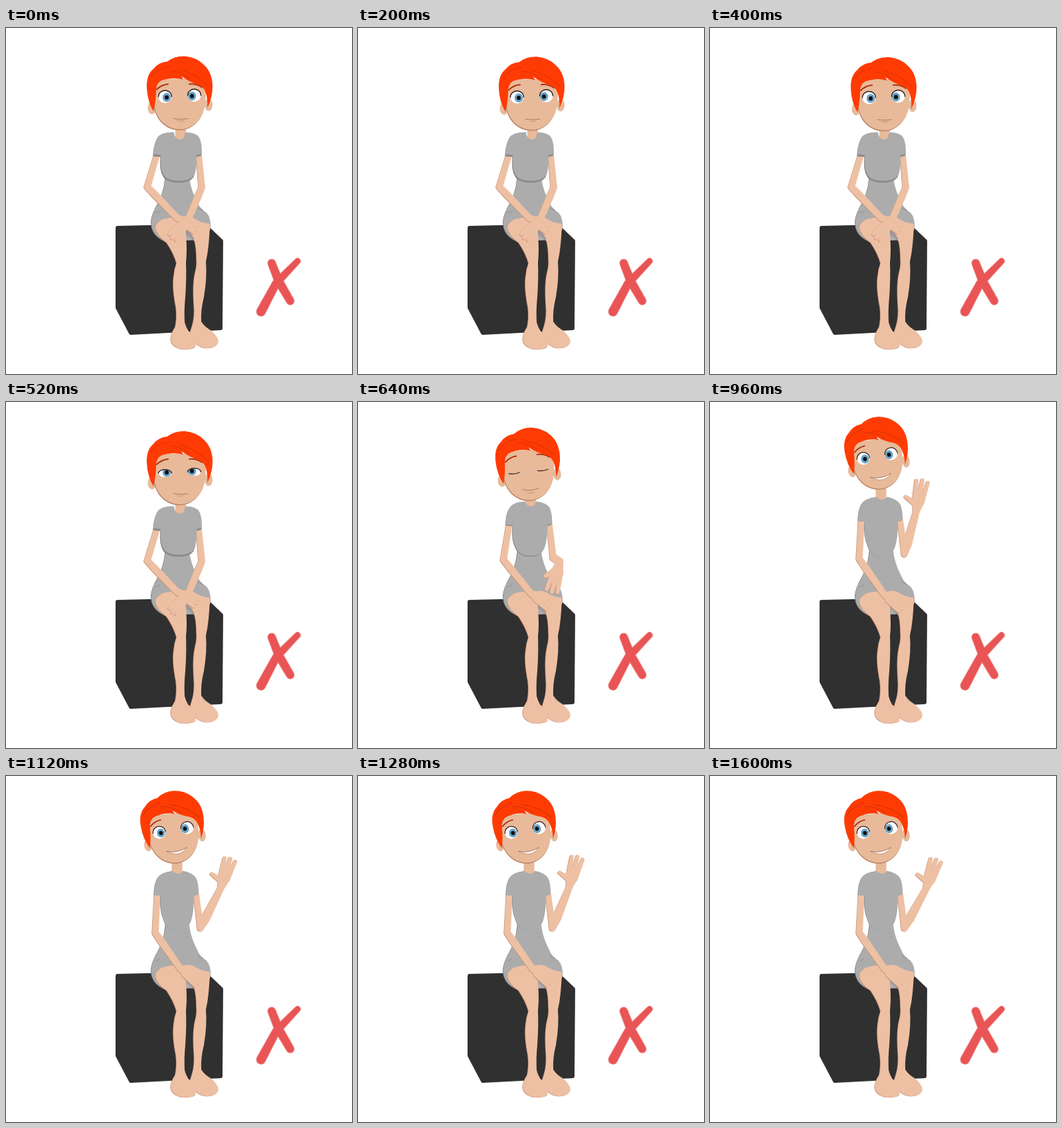
An HTML page with a canvas that plays this animation: 521x521 px, repeating every 1680 ms.

```html
<!DOCTYPE html>
<html lang="en">
<head>
<meta charset="utf-8">
<title>Waving from the box</title>
<style>
  html, body { margin: 0; height: 100%; overflow: hidden; background: #fff; }
  canvas { display: block; width: 100vw; height: 100vh; }
</style>
</head>
<body>
<canvas id="stage" width="521" height="521"></canvas>
<script>
const ctx = document.getElementById('stage').getContext('2d');
const SKIN = '#eec0a3', FACE = '#e8ba9a', SHADE = '#c2927a', GREY = '#acacac', DARK_GREY = '#8b8b8b';
const LOOP = 1680, STEP = 40, LAST = 1600;
const START = 520, BLINK = 640, WAVE = 427;

const clamp = v => Math.max(0, Math.min(1, v));
const mix = (a, b, k) => a + (b - a) * k;
const smooth = v => (v = clamp(v)) * v * (3 - 2 * v);
const easeOut = (v, power) => 1 - (1 - clamp(v)) ** power;
const rad = degrees => degrees * Math.PI / 180;

function fill(shape, color) {
  ctx.fillStyle = color;
  ctx.fill(typeof shape === 'string' ? new Path2D(shape) : shape);
}

function line(shape, color, width = 1) {
  ctx.strokeStyle = color;
  ctx.lineWidth = width;
  ctx.lineCap = ctx.lineJoin = 'round';
  ctx.stroke(typeof shape === 'string' ? new Path2D(shape) : shape);
}

function oval(x, y, rx, ry, color) {
  const path = new Path2D();
  path.ellipse(x, y, rx, ry, 0, 0, 7);
  fill(path, color);
}

function shaded(shape, color, shade = SHADE, dx = -.8, dy = .6) {
  ctx.save();
  ctx.translate(dx, dy);
  fill(shape, shade);
  ctx.restore();
  fill(shape, color);
}

// Tapered capsules through a chain of [x, y, radius]
function limb(path, ...joints) {
  for (let i = 1; i < joints.length; i++) {
    const [x, y, r] = joints[i - 1], [u, v, s] = joints[i];
    const a = Math.atan2(v - y, u - x), q = Math.PI / 2;
    path.moveTo(x + r * Math.cos(a + q), y + r * Math.sin(a + q));
    path.arc(x, y, r, a + q, a + 3 * q);
    path.arc(u, v, s, a - q, a + q);
    path.closePath();
  }
}

// The hand points along angle (clockwise from up); side puts the thumb left or right
function drawArm(shoulder, [ex, ey], [wx, wy], angle, size, side, bulge) {
  const path = new Path2D(), a = rad(angle);
  const px = wx + 16 * size * Math.sin(a), py = wy - 16 * size * Math.cos(a);
  limb(path, shoulder, [ex, ey, 5], [mix(ex, wx, .25), mix(ey, wy, .25), bulge], [wx, wy, 5], [px, py, 9 * size]);
  limb(path, [mix(px, wx, .3), mix(py, wy, .3), 5], [px + 19 * side * size, py - 8 * Math.cos(a), 2.8]);
  for (const i of [-1, 0, 1]) {
    const bx = px + 5.5 * i * size * Math.cos(a), by = py + 5.5 * i * size * Math.sin(a);
    const b = a + rad(6 * i), reach = (34 - 2 * Math.abs(i)) * size;
    limb(path, [bx, by, 4], [bx + reach * Math.sin(b), by - reach * Math.cos(b), 3]);
  }
  shaded(path, SKIN);
}

function drawCube() {
  const box = 'M168 301L300 298L324 321L323 452L188 459L168 421Z';
  fill(box, '#303030');
  line(box, '#303030', 6);
}

function drawCross() {
  const cross = new Path2D();
  limb(cross, [439, 351, 4], [407, 384, 5.5], [384, 427, 6.5]);
  limb(cross, [400, 354, 5.5], [411, 382, 6], [428, 411, 5.5]);
  line(cross, '#f08a8a', 2);
  fill(cross, '#e95455');
}

function drawSkirtAndLegs() {
  shaded('M241 212H276Q274 235 288 262Q292 272 302 278Q309 286 308 302Q304 314 284 319L240 321Q218 312 219 290Q220 279 231 260Q241 240 241 212Z',
    GREY, DARK_GREY, -1, .5);
  fill('M266 296L290 302L287 326Q280 315 268 309Z', '#999');
  line('M225 279L231 276M289 271L297 275', DARK_GREY);
  shaded('M262 287Q275 281 286 288Q292 293 307 295Q306 330 301 352Q303 375 298 405Q293 425 294 442Q298 449 308 455Q320 465 320 472Q318 482 302 482Q288 481 279 466Q276 460 280 450Q285 435 283 415Q281 385 285 368Q288 357 287 348Q287 328 283 317Q278 305 262 296Z', SKIN);
  shaded('M225 302Q224 294 236 288Q250 284 264 286Q271 295 271 312Q273 335 271 353Q272 375 270 405Q268 425 269 443Q272 455 281 464Q288 474 285 481Q276 485 262 483Q249 479 248 468Q249 459 255 450Q258 435 256 420Q250 390 253 372Q254 362 257 354Q253 339 242 323Q228 314 225 302Z', SKIN);
}

function drawShirt(rise) {
  const collar = 157 - 3 * rise, scoop = 168 - 10 * rise, side = 222 + 6 * rise, hem = 230 + 14 * rise;
  ctx.save();
  ctx.translate(258.5 - 2 * rise, -11 * rise);
  ctx.scale(1 - .08 * rise, 1);
  ctx.translate(-258.5, 0);
  shaded(`M253 ${collar}Q254 ${scoop} 262 ${scoop}Q269 ${scoop} 270 ${collar}Q286 157 291 165Q295 172 295 189Q291 191 287 191Q288 212 283 ${side}Q277 ${hem} 262 ${hem}Q244 ${hem} 238 ${side}Q231 212 233 191Q227 191 222 190Q223 172 228 165Q234 156 253 ${collar}Z`,
    GREY, DARK_GREY, -.8, 3 * (1 - rise));
  ctx.restore();
}

function drawEye(x, y, irisX, open) {
  const cy = y + 6 * (1 - open);
  if (open < .1) return line(`M${x - 8} ${cy + 1}Q${x + 1} ${cy + 3} ${x + 8} ${cy}`, '#3a2520', 1.3);
  const lid = new Path2D(), edge = new Path2D();
  lid.ellipse(x, cy, 10, 9.5 * open, 0, 0, 7);
  edge.ellipse(x, cy, 10, 9.5 * open, 0, Math.PI, 2 * Math.PI);
  fill(lid, '#fff');
  ctx.save();
  ctx.clip(lid);
  oval(irisX, y + 1, 6.3, 6.8, '#6aa3c9');
  oval(irisX, y + 1, 3, 3.2, '#111');
  ctx.restore();
  line(edge, '#2a1a17', 1.3);
}

function drawMouth(smile) {
  const half = 11 + 5 * smile, left = 263 - half, right = 263 + half;
  const y = 138 - 3 * smile, lip = y + 3 + 10 * smile;
  const upper = `M${left} ${y}Q263 ${y + 2 + 9 * Math.min(smile, .4)} ${right} ${y - 2 * smile}`;
  if (smile > .5) {
    fill(`${upper}Q267 ${lip} ${left} ${y}Z`, '#fff');
    line(`M${left} ${y}Q267 ${lip} ${right} ${y - 2 * smile}`, '#b57d62', .8);
  } else {
    line(`M258 ${lip}Q263 ${lip + 2} 268 ${lip}`, '#c08a6e', .8);
  }
  line(upper, '#a66f56', .9);
}

function drawHead(x, y, rise, open, smile) {
  const browLift = 9 * clamp(rise * 2 - 1);
  ctx.save();
  ctx.translate(x, y);
  ctx.rotate(rad(-7 * rise));
  ctx.scale(1 - .035 * rise, 1 - .02 * rise);
  ctx.translate(-262, -106);
  oval(220, 122, 6.5, 9.5, FACE);
  oval(305, 117, 6, 9.5, FACE);
  shaded('M224 78H299Q302 100 300 115C297 142 278 154 262 154C245 154 226 142 223 115Q222 95 224 78Z', FACE, '#b98467', -.8, 1.4);
  drawEye(239.5, 105, 242, open);
  drawEye(283.5, 103, 280, open);
  line('M227 94Q234 87 244 86', '#b2300c', 2);
  line(`M276 ${86 - browLift}Q287 ${85 - browLift} 295 ${91 - browLift}`, '#b2300c', 2);
  drawMouth(smile);
  fill('M222 127Q213 112 212 92Q211 72 222 63Q230 53 243 52Q254 43 270 44Q287 46 297 56Q311 68 311 90Q311 106 303 122Q304 108 301 100Q299 91 290 87Q276 83 264 74L267 79Q250 75 235 80Q226 84 226 96Q226 110 222 127Z', '#ff3b04');
  line('M247 66Q262 66 277 78M260 64Q286 70 305 90M218 76Q226 63 246 60', '#dc3303', 1.2);
  ctx.restore();
}

function draw(t) {
  const rise = easeOut((t - START) / 260, 1.2);
  const lift = smooth((t - START) / 360);
  const raise = easeOut((t - START) / 440, 1.6);
  const open = smooth((Math.abs(t - BLINK) - 40) / 140);
  const sway = -Math.cos((t - 960) / WAVE * 2 * Math.PI) * clamp((t - 800) / 160);

  const headX = 262 - 9.5 * rise, headY = 104.5 + 1.5 * clamp(t / 400) - 22.5 * lift;
  const shoulderY = 189 - 12 * rise;
  const wrist = [
    mix(275, 318, raise) + 13 * Math.sin(Math.PI * raise) + 7.5 * sway,
    mix(287, 168, raise) + 2 * sway
  ];
  const handAngle = 220 - 205 * raise ** 2.3 + 4 * sway;
  const handSize = 1 - .6 * Math.sin(rad(handAngle)) ** 2;

  ctx.fillStyle = '#fff';
  ctx.fillRect(0, 0, 521, 521);
  drawCube();
  drawCross();
  drawSkirtAndLegs();
  ctx.fillStyle = FACE;
  ctx.fillRect(headX - 7 + 4 * rise, headY + 38, 16, 26);
  drawArm([228, shoulderY, 4.6], [mix(213, 225, rise), mix(239, 236, rise)],
    [mix(257, 262, rise), mix(285, 289, rise)], mix(120, 128, rise), .7, 1, 5.5);
  drawArm([mix(290.5, 286.5, rise), shoulderY, 4.2], [mix(295, 293, rise), mix(240, 229, rise)],
    wrist, handAngle, handSize, -1, mix(5.5, 7, raise));
  drawShirt(rise);
  drawHead(headX, headY, rise, open, lift);
}

function tick(now) {
  draw(Math.min(LAST, Math.floor(now % LOOP / STEP) * STEP));
  requestAnimationFrame(tick);
}
requestAnimationFrame(tick);
</script>
</body>
</html>
```
